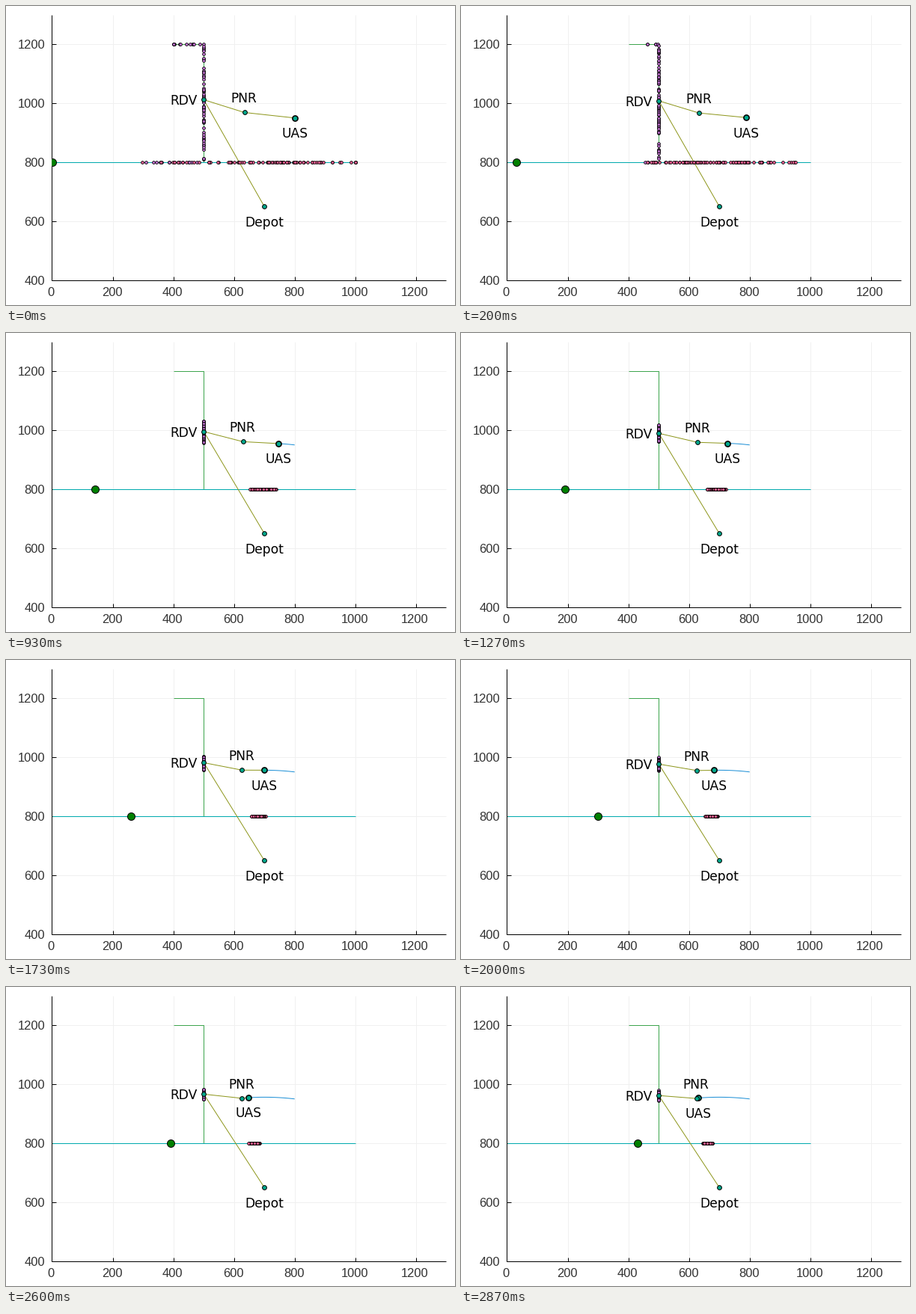
A matplotlib script for the animation above (2.94 s loop, 600 by 400 pixels).

```python
import matplotlib.pyplot as plt
import numpy as np
from matplotlib.animation import FuncAnimation
from matplotlib.patches import Rectangle

LOOP, TICK, FPS, STEPS = 2940, 10, 15, 44
PT = 0.72  # points per pixel at 100 dpi
LEFT, RIGHT, TOP, BOTTOM = 61, 588, 12, 367
PARTICLES = 90

BLUE, GREEN, PURPLE, CYAN = "#1c8fd6", "#3da44d", "#c271d2", "#00a9ad"
PINK, TEAL, OLIVE, TRUCK = "#ed5e93", "#00a98d", "#8e971d", "#008000"


def px(x):
    return 62 + np.asarray(x) * 526 / 1300


def py(y):
    return BOTTOM - (np.asarray(y) - 400) * 0.395


def uas(k):
    return 800 - 3.8 * k - 0.003 * k**2, 950 + 0.46 * k - 0.0089 * k**2


def rendezvous(k):
    return 500, 1011.5 - 1.163 * k


def no_return(k):
    return 634 - 0.38 * k + 0.0035 * k**2, 968.5 - 0.6 * k + 0.0048 * k**2


def cloud(k, seed):
    """Distances along a route, contracting around the rendezvous."""
    half = min(500, 12 + 2000 / (k + 0.8) ** 1.5)
    rng = np.random.default_rng(100 * seed + k)
    q = rng.triangular(-1, 0, 1, PARTICLES)
    return (rendezvous(k)[1] - 300 + half * q).clip(0, 1000)


def north_route(s):
    x = np.interp(s, [0, 500, 900, 1000], [0, 500, 500, 400])
    y = np.interp(s, [500, 900], [800, 1200])
    return x, y


fig = plt.figure(figsize=(6, 4), dpi=100, facecolor="white")
ax = fig.add_axes([0, 0, 1, 1])
ax.set(xlim=(0, 600), ylim=(400, 0))
ax.axis("off")


def line(xs, ys, color, z=2):
    return ax.plot(xs, ys, color=color, lw=PT, zorder=z,
                   solid_capstyle="butt")[0]


def dots(color, size, z, edge=1):
    return ax.plot([], [], "o", mfc=color, mec="black", ms=size * PT,
                   mew=edge * PT, zorder=z)[0]


def text(x, y, s, size, font, color, ha="center"):
    return ax.text(x, y, s, fontsize=size * PT, family=font, color=color,
                   ha=ha, va="baseline", zorder=9)


def tick_text(x, y, v, ha="center"):
    text(x, y, str(v), 16.5, "Liberation Sans", "#333333", ha)


def label(s):
    return text(0, 0, s, 17.1, "DejaVu Sans", "black")


def place(artist, x, y):
    artist.set_data(np.atleast_1d(px(x)), np.atleast_1d(py(y)))


def place_label(artist, x, y):
    artist.set_position((px(x), py(y) + 6.7))


# Grid, axes and tick labels
for v in range(0, 1201, 200):
    x = px(v) if v else LEFT
    if v:
        line([x, x], [TOP, BOTTOM], "#f0f0f0", 0)
    line([x, x], [BOTTOM, BOTTOM - 5], "black", 1)
    tick_text(x - 1, 388, v)
for v in range(400, 1201, 200):
    y = py(v)
    if v > 400:
        line([LEFT, RIGHT], [y, y], "#f0f0f0", 0)
    line([LEFT, LEFT + 6], [y, y], "black", 1)
    tick_text(52, y + 6.4, v, "right")
line([LEFT, LEFT], [TOP, BOTTOM], "black", 1)
line([LEFT, RIGHT], [BOTTOM, BOTTOM], "black", 1)

# Routes
line(px([0, 500, 500, 400]), py([800, 800, 1200, 1200]), GREEN)
line(px([0, 1000]), py([800, 800]), CYAN)

trail = line([], [], BLUE)
plan = line([], [], OLIVE, 3)
north = dots(PURPLE, 3.8, 4, 0.8)
east = dots(PINK, 3.8, 4, 0.8)
drone = dots(TEAL, 7.2, 5, 1.6)
stops = dots(TEAL, 5.8, 6)
truck = dots(TRUCK, 10, 7)
truck.set_clip_path(Rectangle((LEFT, TOP), RIGHT - LEFT, BOTTOM - TOP,
                              transform=ax.transData))

rdv_text, pnr_text, uas_text, depot_text = map(
    label, ["RDV", "PNR", "UAS", "Depot"])
place_label(depot_text, 700, 600)


def draw(i):
    k = min((i * TICK + 5) * FPS // 1000, STEPS - 1)
    u, p, r, depot = uas(k), no_return(k), rendezvous(k), (700, 650)

    place(trail, *uas(np.arange(k + 1)))
    place(plan, *zip(u, p, r, depot))
    place(stops, *zip(p, r, depot))
    place(drone, *u)
    place(truck, 10 * k, 800)
    place(east, cloud(k, 1), np.full(PARTICLES, 800))
    place(north, *north_route(cloud(k, 2)))

    place_label(rdv_text, r[0] - 65, r[1])
    place_label(pnr_text, p[0] - 1, p[1] + 50)
    place_label(uas_text, u[0], u[1] - 50)
    return ()


anim = FuncAnimation(fig, draw, frames=LOOP // TICK, interval=TICK,
                     repeat=True, repeat_delay=0)
plt.show()
```
